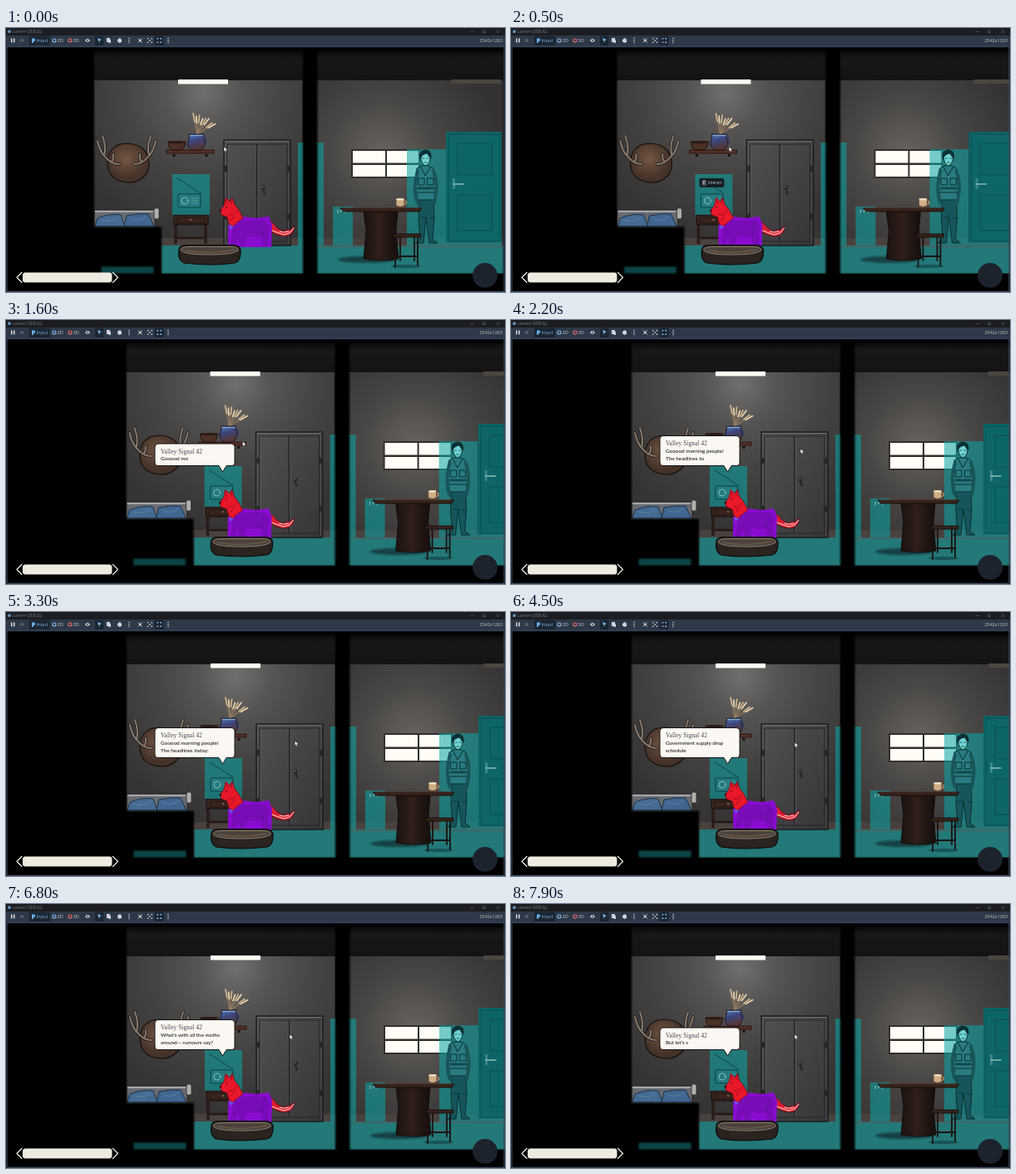
Animation of 600x318 px, one loop 8000 ms. Source, as an HTML page:

```html
<!DOCTYPE html>
<html lang="en">
<head>
<meta charset="utf-8">
<title>Room scene</title>
<style>
html, body { margin: 0; width: 100%; height: 100%; overflow: hidden; background: #000; }
svg { display: block; width: 100vw; height: 100vh; }
text { font-family: "Open Sans", "Noto Sans", sans-serif; font-size: 5.7px; fill: #c4c9d0; }
.teal { fill: #08a4a4; fill-opacity: .56; }
.line { fill: none; stroke-linecap: round; stroke-linejoin: round; }
.speech { font-family: Lato, sans-serif; font-size: 6.35px; font-weight: 500; fill: #1c1a1a; }
.speaker { font-family: "Liberation Serif", serif; font-size: 7.2px; letter-spacing: .15px; fill: #45414a; }
</style>
</head>
<body>
<svg viewBox="0 0 600 318" preserveAspectRatio="none">
<defs>
  <radialGradient id="wallL" gradientUnits="userSpaceOnUse" cx="276" cy="78" r="175">
    <stop offset="0" stop-color="#716f6d"/><stop offset=".25" stop-color="#575554"/><stop offset=".55" stop-color="#464443"/><stop offset="1" stop-color="#353333"/>
  </radialGradient>
  <radialGradient id="wallR" gradientUnits="userSpaceOnUse" cx="492" cy="150" r="140">
    <stop offset="0" stop-color="#67635f"/><stop offset=".45" stop-color="#494745"/><stop offset="1" stop-color="#343232"/>
  </radialGradient>
  <linearGradient id="ceil" x2="0" y2="1">
    <stop offset="0" stop-color="#080808"/><stop offset=".3" stop-color="#191818"/><stop offset="1" stop-color="#141313"/>
  </linearGradient>
  <linearGradient id="steel" x2="1" y2="1">
    <stop offset="0" stop-color="#515053"/><stop offset="1" stop-color="#353437"/>
  </linearGradient>
  <linearGradient id="wood" x2="1">
    <stop offset="0" stop-color="#1b1210"/><stop offset=".45" stop-color="#2f1f1a"/><stop offset="1" stop-color="#140d0c"/>
  </linearGradient>
  <linearGradient id="vase" x2=".3" y2="1">
    <stop offset="0" stop-color="#5580b8"/><stop offset=".45" stop-color="#3c4580"/><stop offset="1" stop-color="#56362f"/>
  </linearGradient>
  <radialGradient id="plaque" cx=".45" cy=".4">
    <stop offset="0" stop-color="#735643"/><stop offset="1" stop-color="#453228"/>
  </radialGradient>
  <filter id="soft" x="-20%" y="-20%" width="140%" height="140%"><feGaussianBlur stdDeviation="1.3"/></filter>
</defs>

<rect width="600" height="318"/>

<g id="world">
  <!-- Rooms -->
  <rect x="144" y="62" width="252" height="202" fill="url(#wallL)"/>
  <rect x="412" y="62" width="226" height="202" fill="url(#wallR)"/>
  <rect x="144" y="26" width="494" height="37" fill="url(#ceil)"/>
  <rect x="144" y="253" width="494" height="10" fill="#49413e"/>
  <rect x="144" y="262" width="494" height="34" fill="#464140"/>
  <rect x="226" y="262" width="412" height="34" class="teal"/>
  <path d="M413 263H638" stroke="#7d4544" stroke-width=".7"/>
  <rect x="246" y="62" width="60" height="5.5" fill="#fffdf4"/>
  <rect x="574" y="62" width="60" height="5" fill="#4d4640"/>

  <!-- Antlers -->
  <path d="M164 150Q170 139 185 139Q202 140 208 151Q214 164 208 176Q198 187 186 186Q169 185 163 173Q159 160 164 150Z" fill="url(#plaque)" stroke="#15100e" stroke-width="1.2"/>
  <g class="line" id="antlers"></g>

  <!-- Shelf -->
  <rect x="232" y="147" width="57" height="4" fill="#562e23" stroke="#1d100c" stroke-width=".8"/>
  <path d="M241 152v3M280 152v3" stroke="#1d100c" stroke-width="3"/>
  <path d="M234 137H255Q254 147 248 147H240Q234 146 234 137Z" fill="#4b3025" stroke="#160e0b" stroke-width=".9"/>
  <ellipse cx="244.500" cy="137.500" rx="10" ry="1.700" fill="#2b1b15"/>
  <g class="line" id="wheat"></g>
  <path d="M259 128H277Q275 131 278 135Q279 144 273 147H263Q256 144 258 136Q260 132 259 128Z" fill="url(#vase)" stroke="#16131f" stroke-width=".9"/>
  <path d="M277 131Q282 133 278 141" class="line" stroke="#30396b" stroke-width="1.200"/>
  <path d="M260 129.500H276" stroke="#89a9d0" stroke-width="1.200"/>

  <!-- Cabinet -->
  <rect x="301" y="135" width="80" height="127" fill="url(#steel)" stroke="#1d1d1e" stroke-width="1.500"/>
  <path d="M302 136.500H380" stroke="#747377" stroke-width="1.200"/>
  <g fill="none" stroke="#242426" stroke-width=".9">
    <rect x="305" y="140" width="35.500" height="117"/><rect x="341" y="140" width="36" height="117"/>
  </g>
  <path d="M306.500 142V255M342.500 142V255M302.500 138V260M379 138V260" stroke="#626165" stroke-width=".6"/>
  <g fill="#252527">
    <rect x="302" y="166" width="3" height="7"/><rect x="302" y="224" width="3" height="7"/>
    <rect x="377" y="166" width="3" height="7"/><rect x="377" y="224" width="3" height="7"/>
    <circle cx="348" cy="192" r="2.500"/><path d="M347 193h2l2 7-2 1z"/>
  </g>
  <circle cx="347.500" cy="191.500" r="1" fill="#77757a"/>

  <!-- Radio and table -->
  <path d="M243 236V260M279 236V260" stroke="#2b1b17" stroke-width="3.500"/>
  <path d="M245 253H277" stroke="#251713" stroke-width="2.500"/>
  <rect x="241" y="225" width="41" height="12" fill="#38241e" stroke="#150e0c"/>
  <rect x="245" y="228" width="33" height="7" fill="none" stroke="#1a100d" stroke-width=".8"/>
  <circle cx="261" cy="231" r="1" fill="#9b7962"/>
  <rect x="239" y="176" width="45" height="49" class="teal"/>
  <g class="line" stroke="#0b4346">
    <rect x="246" y="200" width="27" height="16" rx="1.500" fill="#247b7d" stroke-width="1.100"/>
    <path d="M245 181L273 199" stroke="#0b4346" stroke-width="1"/>
    <circle cx="254" cy="208" r="4" stroke="#8fc9c4" stroke-width=".9"/>
    <path d="M262 205h8M262 208h8M262 211h8" stroke="#66aaa8" stroke-width=".7"/>
  </g>
  <rect x="390" y="138" width="31" height="124" class="teal"/>

  <!-- Sofa -->
  <path d="M145 219H218V241H145Z" fill="#686b70" stroke="#252628"/>
  <path d="M146 221H216" stroke="#a5a7a8" stroke-width="2"/>
  <rect x="217" y="217" width="6" height="13" rx="2" fill="#b0afab" stroke="#29292b" stroke-width=".8"/>
  <path d="M149 229Q163 223 177 225L182 239H146Z" fill="#456b92" stroke="#1d3049"/>
  <path d="M184 226Q198 223 210 224L217 239H181Z" fill="#41668f" stroke="#1d3049"/>
  <path d="M154 231Q164 235 174 228M188 229Q198 235 208 227" class="line" stroke="#6488aa" stroke-width=".8"/>

  <!-- Window -->
  <rect x="454" y="146" width="83" height="35" fill="#332f2c"/>
  <path d="M456 148h39v14.500h-39zM497 148h38v14.500h-38zM456 165h39v14h-39zM497 165h38v14h-38z" fill="#fffdf6"/>

  <!-- Resident -->
  <rect x="521" y="146" width="47" height="116" class="teal"/>
  <g class="line" stroke="#0a2f32" stroke-width="1">
    <path d="M536 204L535 230L537 254L531 259H541L544 228L548 259H558L552 254L554 229L553 204Z" fill="#16565a"/>
    <path d="M539 166L533 169L531 185L534 207H554L556 184L553 169L547 166Z" fill="#287b7e"/>
    <path d="M534 172Q529 188 532 205L534 211M553 172Q559 188 555 205L554 211" stroke="#185559" stroke-width="4"/>
    <path d="M538 168L543 178L549 168M535 181h7v8h-7zM546 181h7v8h-7zM534 198H554M538 228h5M549 229h4" stroke-width="1"/>
    <path d="M535 193H553" stroke="#13494d" stroke-width="3"/>
    <path d="M538 154Q539 148 544 148Q550 149 549 157Q548 165 543 166Q537 162 538 154Z" fill="#70d3d0"/>
    <path d="M537 157Q535 149 542 147Q551 146 550 157Q547 155 546 151Q540 151 537 157Z" fill="#0b3035"/>
    <path d="M540 157h2M545 157h2M542 162h3" stroke-width=".7"/>
  </g>

  <!-- Door -->
  <rect x="568" y="125" width="67" height="133" fill="#151416"/>
  <rect x="568" y="125" width="67" height="137" class="teal"/>
  <g fill="none" stroke="#0a5154" stroke-width="1">
    <rect x="571" y="128" width="62" height="129"/><rect x="582" y="139" width="41" height="38"/><rect x="582" y="201" width="41" height="43"/>
  </g>
  <rect x="576" y="181" width="3" height="13" rx="1" fill="#3b8788"/>
  <path d="M577 188H589" class="line" stroke="#8dbab7" stroke-width="1.600"/>

  <!-- Table, mug and stool -->
  <rect x="432" y="215" width="24" height="47" class="teal"/>
  <path d="M438 219v4M442 219v3M447 219v4" stroke="#b9d5d0" stroke-width=".8"/>
  <ellipse cx="473" cy="279" rx="35" ry="4" fill="#071f20" opacity=".6" filter="url(#soft)"/>
  <path d="M469 221H510L508 244L511 278Q490 282 469 278L472 244Z" fill="url(#wood)" stroke="#0d0807" stroke-width=".8"/>
  <path d="M441 217H539L536 221H445Z" fill="#38241c" stroke="#150d0a" stroke-width=".9"/>
  <path d="M443 216.800H537" stroke="#684635" stroke-width=".7"/>
  <path d="M518 208Q523 210 518 213" class="line" stroke="#c9a67d" stroke-width="1.200"/>
  <path d="M508 206H518V214Q513 217 508 214Z" fill="#d0ad84" stroke="#4a3426" stroke-width=".7"/>
  <ellipse cx="513" cy="206.300" rx="5" ry="1.200" fill="#f3dec0"/>
  <ellipse cx="520" cy="287" rx="18" ry="2" fill="#071f20" opacity=".4"/>
  <path d="M508 251L507 288M534 251V286M513 251V280M530 251V280M508 275H533" class="line" stroke="#1b1210" stroke-width="1.800"/>
  <rect x="505" y="248" width="33" height="4" rx="1" fill="#36231c" stroke="#120b09" stroke-width=".8"/>

  <!-- Dog -->
  <g id="dog">
    <path d="M316 232L322 236L326 241L333 245L338 243L342 243L347 238L345 246L340 250L334 251L326 249L320 246L315 241Z" fill="#dd1e30" stroke="#4d0b18" stroke-width=".7"/>
    <path d="M320 244L328 247L334 249L341 247L346 241M329 245L334 246L340 245" class="line" stroke="#f1d3c8" stroke-width="1.100"/>
    <path d="M267 238L274 229L284 227L301 229L316 227L320 237L319 264H267Z" fill="#8a0cd0"/>
    <path d="M272 239L284 232L312 231L318 240L315 250L317 263H309L306 251L290 249L287 263H281L279 251L275 263H269L272 250Z" fill="#780db8"/>
    <path d="M288 249Q299 253 307 249M311 236Q306 243 309 250" class="line" stroke="#55148a" stroke-width=".7"/>
    <path d="M257 220L262 214L264 204L269 209L272 204L275 213L280 219L285 229L277 235L273 239L268 236L266 228L259 225Z" fill="#e81829" stroke="#5b0912" stroke-width=".7"/>
    <path d="M265 207L266 212M271 207V212M268 225Q274 227 278 220M270 232L274 227" class="line" stroke="#980c1c" stroke-width=".9"/>
    <circle cx="265" cy="216" r=".8" fill="#2b050a"/><circle cx="258" cy="220" r="1.200" fill="#2b050a"/>
    <path d="M268 237L274 239L270 243Z" fill="#6d52e8"/>
  </g>

  <!-- Dog bed -->
  <path d="M247 267Q247 262 255 261.500H312Q322 262 321 270Q321 281 314 283Q284 287 253 283Q245 279 247 267Z" fill="#2a2320" stroke="#0d0a09" stroke-width="1.200"/>
  <path d="M249 267Q250 264 258 263.500H311Q319 264 318 268Q312 273 284 273Q251 273 249 267Z" fill="#4c423b" stroke="#8b7e6e" stroke-width="1"/>
  <path d="M255 268Q284 273 313 267" class="line" stroke="#675a4d" stroke-width="1.500"/>

  <!-- Foreground shadows -->
  <g filter="url(#soft)">
    <rect x="130" y="239.500" width="96" height="62"/>
    <rect x="396" y="20" width="17.500" height="300"/>
    <rect x="134" y="20" width="11" height="290"/>
    <rect x="130" y="296" width="530" height="20"/>
    <rect x="130" y="18" width="530" height="9"/>
    <rect x="637" y="20" width="30" height="300"/>
    <rect x="154" y="288" width="62" height="7" fill="#0b4547"/>
  </g>

  <g id="prompt">
    <rect x="244" y="181" width="30" height="11" rx="2.500" fill="#16191f" fill-opacity=".93"/>
    <rect x="247" y="183" width="5.500" height="7" rx="1" fill="#4a4f57"/>
    <text x="248.300" y="188.400" style="font-size:5px;font-weight:700">E</text>
    <text x="254.500" y="188.300" style="font-size:4.600px">Interact</text>
  </g>
</g>

<g id="bubble">
  <path id="balloon" fill="#fbf8f3" stroke="#171514" stroke-width="1"/>
  <text id="speaker" class="speaker" x="186">Valley Signal 42</text>
  <text id="row0" class="speech" x="186"></text>
  <text id="row1" class="speech" x="186" y="169"></text>
</g>

<!-- Health bar and badge -->
<rect x="20" y="294.500" width="107.500" height="12" rx="3.500" fill="#eeeae0"/>
<path d="M19 294.500L13 300.500L19 306.500M128.500 294.500L134.500 300.500L128.500 306.500" class="line" stroke="#eeeae0" stroke-width="1.300"/>
<circle cx="576" cy="298" r="15" fill="#1d232d"/>

<!-- Window frame -->
<rect width="600" height="9" fill="#1b1d21"/>
<rect y="9" width="600" height="13" fill="#2d3948"/>
<path d="M1 22.500V317.500H599V22.500Z" fill="none" stroke="#34455a" stroke-width="1.300"/>
<circle cx="4" cy="4.200" r="2" fill="#5e8fb8"/>
<text x="8" y="6" style="font-size:4.500px;fill:#777c83">Lantern (DEBUG)</text>
<path d="M559 4.500h3M574 3h2.500v2.500h-2.500zM590 3l3 3M593 3l-3 3" class="line" stroke="#777b82" stroke-width=".5"/>
<g fill="#1c2632">
  <rect x="28" y="9.500" width="25" height="11.500" rx="1.500"/><rect x="107" y="9.500" width="10.500" height="11.500" rx="1.500"/><rect x="178.500" y="9.500" width="11" height="11.500" rx="1.500"/>
</g>
<path d="M6 12.500h1.500v5H6zM9 12.500h1.500v5H9z" fill="#d8dce1"/>
<path d="M17 13v4M19 13l2 2-2 2z" fill="#69727d" stroke="#69727d" stroke-width=".6"/>
<path d="M31 12.500h4v3.500h-2v2h-2z" fill="#66aadd"/>
<text x="36.500" y="17" style="fill:#74b4e8">Input</text>
<g fill="none" stroke-width="1.200"><circle cx="58" cy="15" r="2" stroke="#83b4e6"/><circle cx="77" cy="15" r="2" stroke="#e8686d"/></g>
<text x="61.500" y="17">2D</text><text x="80.500" y="17">3D</text>
<g fill="#cdd2d9">
  <path d="M95 15Q98 11 101 15Q98 19 95 15Z"/><circle cx="98" cy="15" r="1" fill="#2d3948"/>
  <path d="M110 12l5 2-2 1-1 2.500z" fill="#79baf0"/>
  <path d="M121 12h4v2h1v4h-2l-1-1h-2z"/><path d="M134 14l3-2 2 2v3l-3 1-2-2z"/>
  <path d="M159 12.500l4.500 5M163.500 12.500l-4.500 5" stroke="#cdd2d9"/><rect x="160" y="14" width="2.500" height="2"/>
  <path d="M170 12h2l-2 2zM176 12v2l-2-2zM170 18v-2l2 2zM176 18h-2l2-2z"/><circle cx="173" cy="15" r=".9"/>
  <path d="M181.500 12h2v1h-1v1h-1zM185 12h2v2h-1v-1h-1zM181.500 16h1v1h1v1h-2zM186 16h1v2h-2v-1h1z" fill="#79baf0"/>
  <g id="dots"></g>
</g>
<text x="597" y="17" text-anchor="end" style="font-size:5.400px">2542x1263</text>

<path id="cursor" d="M0 0V6L1.500 4.700L2.500 6.700L3.500 6.200L2.600 4.300L4.500 4Z" fill="#fff" stroke="#111" stroke-width=".5"/>
</svg>

<script>
const LOOP = 8000, STEP = 100;
const byId = id => document.getElementById(id);
const clamp = v => Math.min(1, Math.max(0, v));
const smooth = v => (v = clamp(v)) * v * (3 - 2 * v);

const path = (d, color, width) =>
  `<path d="${d}" stroke="${color}" stroke-width="${width}"/>`;

// Mirrored antlers, each drawn as a dark rim under a light core.
const half = s => {
  const x = v => 184 + s * v;
  return `M${x(9)} 164Q${x(18)} 164 ${x(25)} 156Q${x(32)} 150 ${x(35)} 136` +
    `M${x(27)} 154Q${x(24)} 144 ${x(29)} 130M${x(18)} 161Q${x(15)} 157 ${x(16)} 152`;
};
const antlers = half(-1) + half(1);
byId("antlers").innerHTML = path(antlers, "#1a1613", 3.6) + path(antlers, "#85796c", 2.2);

// Stalks fan out of the vase; each ear covers the outer part of its stalk.
let stalks = "";
for (let i = 0; i < 8; i++) {
  const x = 264 + i * 3.8, y = 103 + (i * 5 % 8) * .6 + i * i * .22;
  const earX = x + (269 - x) * .38, earY = y + (128 - y) * .38;
  stalks += path(`M269 128L${x} ${y}`, "#a5865f", .7) +
    path(`M${x} ${y}L${earX} ${earY}`, i % 2 ? "#ead6b4" : "#d3b68d", 1.7);
}
byId("wheat").innerHTML = stalks;

byId("dots").innerHTML = [148, 195].map(x =>
  [12.5, 15, 17.5].map(y => `<circle cx="${x}" cy="${y}" r=".8"/>`).join("")).join("");

const WALK = { time: .47, distance: 39, follow: 3.4 };
const TYPING = 50;
const lines = [
  [1410, "Gooood morning people!\nThe headlines today:"],
  [3870, "Government supply drop\nschedule changed."],
  [4910, "What's with all the moths\naround— rumours say?"],
  [7670, "But let's start"]
];

// The camera trails the dog with exponential smoothing.
function moveCamera(s) {
  const { time, distance, follow } = WALK;
  const done = clamp(s / time), walked = Math.min(s, time);
  const lag = distance / time / follow * (1 - Math.exp(-follow * walked)) *
    Math.exp(-follow * Math.max(0, s - time));
  const bob = done < 1 ? -.7 * Math.abs(Math.sin(done * Math.PI * 2)) : 0;
  byId("world").setAttribute("transform", `translate(${distance * (done - 1) - lag} 0)`);
  byId("dog").setAttribute("transform", `translate(${distance * (1 - done)} ${bob})`);
}

function speak(t) {
  const line = lines.filter(([start]) => t >= start).pop();
  byId("bubble").style.display = line ? "" : "none";
  if (!line) return;
  const typed = line[1].slice(0, Math.floor((t - line[0]) / 1000 * TYPING));
  const rows = typed.split("\n");
  const top = rows.length > 1 ? 139.5 : 149;
  byId("balloon").setAttribute("d",
    `M183 ${top}H271Q275 ${top} 275 ${top + 4}V171Q275 175.500 271 175.500H265L260.500 183L256 175.500H183Q179 175.500 179 171V${top + 4}Q179 ${top} 183 ${top}Z`);
  byId("speaker").setAttribute("y", top + 11.5);
  byId("row0").setAttribute("y", top + 20);
  byId("row0").textContent = rows[0];
  byId("row1").textContent = rows[1] || "";
}

function moveCursor(t) {
  const out = smooth((t - 1400) / 600), back = smooth((t - 3200) / 500);
  const x = 262 + 86 * out - 7 * back, y = 143 + 12 * out + 2 * back;
  byId("cursor").setAttribute("transform", `translate(${x} ${y})`);
}

function draw(now) {
  const t = Math.floor(now % LOOP / STEP) * STEP;
  moveCamera(t / 1000);
  byId("prompt").style.display = t >= 300 && t < lines[0][0] ? "" : "none";
  speak(t);
  moveCursor(t);
}

const begin = performance.now();
function tick() {
  draw(performance.now() - begin);
  requestAnimationFrame(tick);
}
tick();
</script>
</body>
</html>
```
